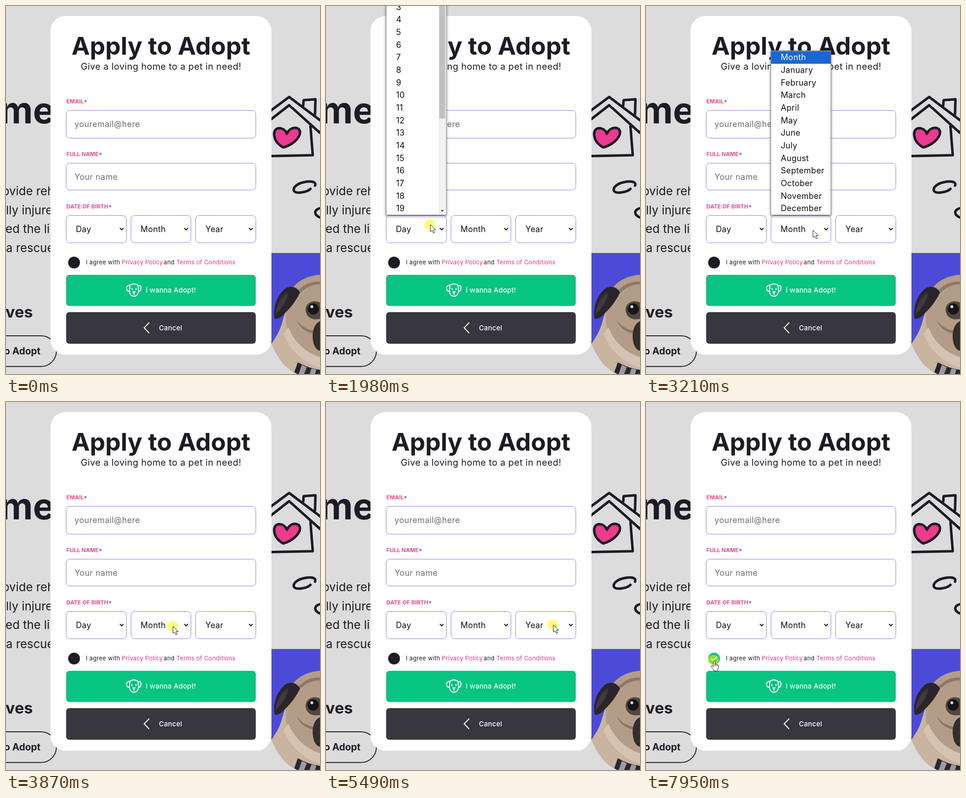
An HTML page that plays this animation: 692x809 px, repeating every 8000 ms.

```html
<!DOCTYPE html>
<html lang="en">
<head>
<meta charset="utf-8">
<title>Apply to Adopt</title>
<style>
  html, body { margin: 0; width: 100%; height: 100%; overflow: hidden; background: #dcdcdc; }
  svg { display: block; width: 692px; height: 809px; font-family: Inter, "Open Sans", sans-serif; fill: #1d1b26; }
  .ink { fill: none; stroke: #1d1b26; stroke-width: 5.5; stroke-linecap: round; stroke-linejoin: round; }
  .bold { font-weight: 700; }
  .end { text-anchor: end; }
  .mid { text-anchor: middle; }
  .copy { font-size: 26px; }
  .label { font-size: 12.4px; font-weight: 600; fill: #ec3a84; }
  .label tspan { fill: #6b6bdc; }
  .field { fill: #fff; stroke: #8c75f0; }
  .value { font-size: 18px; letter-spacing: .3px; fill: #111; }
  .hint { fill: #6d6d6d; letter-spacing: .45px; }
  .terms { font-size: 13px; letter-spacing: .33px; }
  .link { fill: #e6337f; }
  .button { font-size: 15px; font-weight: 500; letter-spacing: .25px; fill: #fff; }
  .icon { fill: none; stroke: #fff; stroke-width: 2.2; stroke-linecap: round; stroke-linejoin: round; }
  .popup { filter: drop-shadow(0 2px 3px #0007); }
  .pointer { fill: #fff; stroke: #111; stroke-linejoin: round; }
</style>
</head>
<body>
<svg viewBox="0 0 692 809">
  <!-- page behind the dialog -->
  <text class="bold end" x="107" y="258" font-size="80">me</text>
  <g class="copy">
    <text x="-8" y="416">ovide reh</text>
    <text x="0" y="457.5">lly injure</text>
    <text x="-1" y="499">ed the li</text>
    <text x="0" y="540.5">a rescue</text>
  </g>
  <text class="bold end" x="59" y="685" font-size="34.5">ves</text>
  <rect x="-120" y="725" width="231" height="67.5" rx="33.7" fill="none" stroke="#1d1b26" stroke-width="2"/>
  <text class="bold end" x="76" y="766" font-size="21">o Adopt</text>

  <g class="ink">
    <path d="M578 234L624 200L700 257M578 254L624 218L692 279L698 266M655 219L656 207L682 205L681 238M671 264L676 328L578 330"/>
    <path fill="#ec3a8c" d="M619 281C614 265 591 264 591 281C591 297 602 306 611 311C630 306 648 291 648 277C647 264 626 264 619 281Z"/>
    <path d="M681 395C685 386 672 384 658 387C641 390 631 400 635 407C640 413 663 410 671 402M695 444C678 446 676 460 695 466"/>
  </g>

  <clipPath id="frame"><path d="M580 543H692V809H642C614 796 596 770 585 741L580 730Z"/></clipPath>
  <g clip-path="url(#frame)">
    <path fill="#4b4bd8" d="M580 543H692V809H580Z"/>
    <path fill="#c9b49f" d="M622 650C612 680 608 705 598 722L582 748V809H692V680Z"/>
    <path fill="#b39c88" d="M630 622C645 601 670 592 692 591V775C660 766 628 742 618 704C614 680 620 650 630 622Z"/>
    <path fill="#d3c3b2" d="M622 706C638 745 668 765 692 772V795C655 785 625 755 612 722Z"/>
    <path fill="#8c7868" d="M645 625Q665 604 692 606V612Q667 612 649 630ZM640 690Q655 710 678 714L676 720Q650 714 640 690Z"/>
    <path fill="#29252a" d="M592 687C587 661 600 630 619 619C632 614 643 620 648 630C638 650 628 662 617 673C609 682 600 690 592 687Z"/>
    <path fill="#413940" d="M594 678C596 655 608 636 622 629C619 649 608 664 594 678Z"/>
    <path fill="#51473f" d="M660 668C661 650 680 645 692 652V688C676 691 662 686 660 668Z"/>
    <circle cx="677" cy="666" r="12.5" fill="#17151a"/>
    <circle cx="674" cy="661" r="3.2" fill="#d9d9dd"/>
    <path fill="#332d2e" d="M692 693C676 700 673 723 678 742C681 752 687 757 692 758Z"/>
    <path fill="#29272e" d="M643 783Q665 796 692 800V809H634Z"/>
    <path fill="#9b9a9f" d="M652 789L663 794L657 809H645ZM673 797L684 799L681 809H669Z"/>
  </g>

  <!-- dialog -->
  <rect x="98" y="22" width="487" height="744.5" rx="33" fill="#fff"/>
  <text class="bold mid" x="341.5" y="106.5" font-size="54">Apply to Adopt</text>
  <text class="mid" x="341.7" y="140" font-size="20" letter-spacing=".45">Give a loving home to a pet in need!</text>

  <g class="label">
    <text x="133" y="214.3">EMAIL<tspan>*</tspan></text>
    <text x="133" y="329.8">FULL NAME<tspan>*</tspan></text>
    <text x="133" y="445.3">DATE OF BIRTH<tspan>*</tspan></text>
  </g>
  <g class="field">
    <rect x="132.5" y="229.5" width="418" height="61" rx="8"/>
    <rect x="132.5" y="345.5" width="418" height="59" rx="8"/>
    <rect x="132.5" y="460.5" width="133" height="60" rx="8"/>
    <rect x="275.5" y="460.5" width="132" height="60" rx="8"/>
    <rect x="417.5" y="460.5" width="133" height="60" rx="8"/>
  </g>
  <g class="value">
    <text class="hint" x="151" y="266">youremail@here</text>
    <text class="hint" x="151" y="381.5">Your name</text>
    <text x="154" y="497">Day</text>
    <text x="296.5" y="497">Month</text>
    <text x="439.5" y="497">Year</text>
  </g>
  <path fill="none" stroke="#111" stroke-width="2" d="M251 488l4 4.3l4-4.3M393 488l4 4.3l4-4.3M535.500 488l4 4.300l4-4.300"/>
  <path id="caret" stroke="#111" d="M151.500 0v23"/>

  <circle id="box" cx="150" cy="564" r="13"/>
  <path id="tick" class="icon" stroke-width="2" d="M144 564.500l4 4.500l8.500-9.500"/>
  <g class="terms">
    <text x="176" y="568">I agree with</text>
    <text class="link" x="255" y="568">Privacy Policy</text>
    <text x="347.500" y="568">and</text>
    <text class="link" x="375.500" y="568">Terms of Conditions</text>
  </g>

  <rect x="132.500" y="591" width="418" height="68.500" rx="7" fill="#06c481"/>
  <rect x="132.500" y="673" width="418" height="69.500" rx="7" fill="#38373e"/>
  <g class="icon">
    <path d="M273 614C278 610 286 610 291 614C298 614 298 619 297 623C296 627 294 628 292 626C292 634 287 638 282 638C277 638 272 634 272 626C270 628 267 627 266 623C265 619 266 614 273 614M273 614C273 619 272 622 272 626M291 614C291 619 292 622 292 626M282 630V634"/>
    <path d="M277.500 622v.4M286.500 622v.4" stroke-width="3"/>
    <path d="M279.500 628h5l-2.500 2.500z"/>
    <path d="M315 696.500L304.500 707.500L315 718.500"/>
  </g>
  <text class="button" x="308" y="629.500">I wanna Adopt!</text>
  <text class="button" x="337" y="712.500">Cancel</text>

  <g id="popups"></g>

  <g id="cursor">
    <circle id="glow" cx="-.5" r="12" fill="#fff500" fill-opacity=".5"/>
    <path id="arrow" class="pointer" d="M.5 0V16L4.300 12.600L7 18.700L9.800 17.500L7.200 11.600H12Z"/>
    <path id="beam" fill="none" stroke="#333" stroke-width="1.200" d="M-1 -6.500Q2 -6.500 2 -5Q2 -6.500 5 -6.500M2 -5V6M-1 7.500Q2 7.500 2 6Q2 7.500 5 7.500"/>
    <g id="hand" class="pointer">
      <path d="M-.5 14V2.500Q-.5 .5 1.300 .5T3 2.500V8.500Q4.500 7 6 9Q7.500 7.800 8.700 9.800Q10.500 9.300 10.500 11.500V16Q10.500 19 8.500 21V23.500H.5V21Q-2.500 18 -5 14Q-5.500 12 -4 11.500Q-2.500 11.500 -.5 14Z"/>
      <path d="M3 8.500V12.500M6 9.500V12.500M8.500 10.500V12.500"/>
    </g>
  </g>
</svg>
<script>
const $ = id => document.getElementById(id);
const LOOP = 8000, ROW = 27.67;
const range = (n, f) => Array.from({ length: n }, (_, i) => f(i));
const show = (el, on) => { el.style.display = on ? "" : "none"; };

// Spans in which the screen was refreshed: start, end, number of pictures
const bursts = [[200, 680, 8], [880, 1220, 6], [1420, 2050, 9], [2510, 3210, 10],
  [3870, 4630, 11], [6040, 6810, 12], [6940, 7290, 6]];

// Pointer moves: start, end, target
const moves = [[130, 680, 292, 250], [948, 1220, 293, 378.5], [1499, 1892, 229.5, 480.5],
  [2588, 3054, 367.5, 493], [3946, 4478, 500.5, 490], [5970, 6530, 185, 546], [6530, 6810, 149, 568]];

const clicks = [880, 1420, 1890, 2510, 3050, 3870, 4475, 5490, 6940, 7950];

const months = ["January", "February", "March", "April", "May", "June", "July",
  "August", "September", "October", "November", "December"];
const years = range(19, i => 2006 - i - (i > 5));

const popups = [
  { x: 132.5, open: 1890, close: 2510, total: 32, items: ["Day", ...range(19, i => i + 1)] },
  { x: 275, open: 3050, close: 3870, total: 13, items: ["Month", ...months] },
  { x: 417.5, open: 4475, close: 5490, total: 30, items: ["Year", ...years] }
];

function popupMarkup({ x, total, items }) {
  const n = items.length, top = 459 - n * ROW;
  let s = `<rect x="${x}" y="${top - 1}" width="132.5" height="${n * ROW + 1.5}" fill="#fff" stroke="#777"/>
    <rect x="${x + .5}" y="${top}" width="131.5" height="${ROW}" fill="#1967d2"/>`;
  items.forEach((label, i) => {
    s += `<text class="value" x="${x + 22}" y="${top + i * ROW + 20}" ${i ? "" : 'style="fill:#fff"'}>${label}</text>`;
  });
  if (total > n) {
    const track = n * ROW - 34;
    s += `<rect x="${x + 115.5}" y="${top}" width="16.5" height="${n * ROW}" fill="#f1f1f1"/>
      <rect x="${x + 117}" y="${top + 17}" width="13" height="${track * n / total}" fill="#c1c1c1"/>
      <path d="M${x + 120} 448.500h7.500l-3.750 4z" fill="#505050"/>`;
  }
  return s;
}

for (const p of popups) {
  p.el = document.createElementNS("http://www.w3.org/2000/svg", "g");
  p.el.setAttribute("class", "popup");
  p.el.innerHTML = popupMarkup(p);
  $("popups").append(p.el);
}

function refreshTime(t) {
  for (const [start, end, n] of bursts) {
    if (t < start || t > end) continue;
    const step = (end - start) / (n - 1);
    return start + Math.floor((t - start) / step + .01) * step;
  }
  return t;
}

function pointerAt(t) {
  let x = 670, y = 800;
  for (const [start, end, tx, ty] of moves) {
    const k = Math.min(1, Math.max(0, (t - start) / (end - start)));
    const e = k * k * (3 - 2 * k);
    x += (tx - x) * e;
    y += (ty - y) * e;
  }
  return [x, y];
}

function pointerKind(x, y) {
  if (Math.hypot(x - 150, y - 564) < 13) return "hand";
  if (x < 132 || x > 551) return "arrow";
  if (y > 591 && y < 742) return "hand";
  return (y > 229 && y < 291) || (y > 345 && y < 405) ? "beam" : "arrow";
}

function draw(time) {
  const t = refreshTime(time);
  const [x, y] = pointerAt(t), kind = pointerKind(x, y);
  show($("cursor"), t >= 200);
  $("cursor").setAttribute("transform", `translate(${x} ${y})`);
  for (const id of ["arrow", "beam", "hand"]) show($(id), id === kind);
  show($("glow"), clicks.some(c => t >= c && t < c + 145));

  show($("caret"), t >= 880 && t < 1890);
  $("caret").setAttribute("transform", `translate(0 ${t < 1420 ? 248 : 363.5})`);
  for (const p of popups) show(p.el, t >= p.open && t < p.close);

  const done = Math.min(1, Math.max(0, (t - 6940) / 350));
  const mix = (a, b) => Math.round(a + (b - a) * done);
  $("box").setAttribute("fill", `rgb(${mix(29, 6)},${mix(27, 196)},${mix(38, 129)})`);
  $("tick").setAttribute("opacity", done);
}

function tick() {
  draw(performance.now() % LOOP);
  requestAnimationFrame(tick);
}
tick();
</script>
</body>
</html>
```
